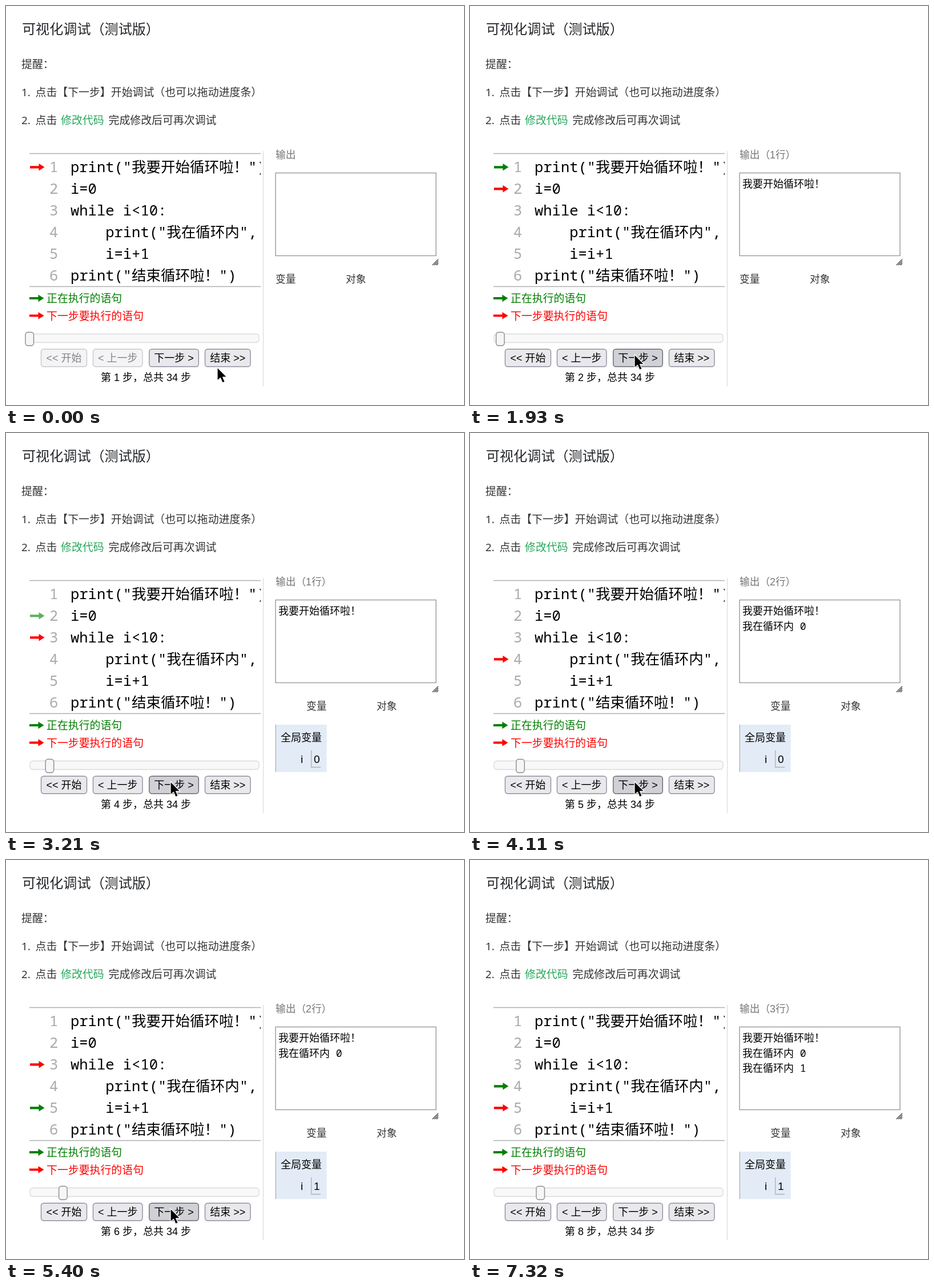
Recreate the animation shown at these times as an HTML page. Size 802 by 699 pixels, loop 8.39 s.

```html
<!DOCTYPE html>
<html lang="zh-CN">
<head>
<meta charset="utf-8">
<title>可视化调试</title>
<style>
html, body { margin: 0; width: 100%; height: 100%; overflow: hidden; background: #fff; }
svg { display: block; }
text { font-family: "Liberation Sans", "Noto Sans CJK SC", sans-serif; font-size: 18px; white-space: pre; }
.body text { font-family: "Noto Sans", "Noto Sans CJK SC", sans-serif; font-size: 18.9px; fill: #333; }
.body .title { font-size: 24.1px; font-weight: 500; fill: #24272b; }
.body .link { fill: #27a75c; }
.code text, .out { font-family: "Noto Sans Mono", "Noto Sans CJK SC", monospace; }
.code text { font-size: 25.5px; }
.code .num { fill: #aaa; }
.legend text { font-size: 18.9px; }
.label { font-size: 17.7px; fill: #333; }
.var { font-size: 19px; }
</style>
</head>
<body>
<svg id="stage" width="802" height="699" viewBox="0 0 802 699">
  <defs>
    <path id="arrow" d="M0 -2.1H15.5V-6.3L25.5 0L15.5 6.3V2.1H0Z"/>
    <clipPath id="pane"><rect x="41" y="259" width="405" height="232"/></clipPath>
  </defs>
  <g class="body">
    <text class="title" x="28" y="49">可视化调试（测试版）</text>
    <text x="27" y="109">提醒：</text>
    <text x="27" y="158">1.</text>
    <text x="51.5" y="158">点击【下一步】开始调试（也可以拖动进度条）</text>
    <text x="27" y="207">2.</text>
    <text x="51.5" y="207">点击</text>
    <text class="link" x="96" y="207">修改代码</text>
    <text x="179.5" y="207">完成修改后可再次调试</text>
  </g>
  <path d="M41 258.5H446M41 491.5H446" stroke="#b0b0b0" stroke-width="1.5"/>
  <path d="M450.5 254V666" stroke="#dcdcdc" stroke-width="1.3"/>
  <g id="code" class="code" clip-path="url(#pane)"></g>
  <use id="done" href="#arrow"/>
  <use id="next" href="#arrow" fill="#f00"/>
  <g class="legend" fill="#008000">
    <use href="#arrow" x="41" y="512"/>
    <text x="71" y="518.5">正在执行的语句</text>
  </g>
  <g class="legend" fill="#f00">
    <use href="#arrow" x="41" y="542.5"/>
    <text x="71" y="549.5">下一步要执行的语句</text>
  </g>
  <rect x="42" y="574.5" width="401" height="15" rx="5" fill="#f8f8f8" stroke="#dadada" stroke-width="1.3"/>
  <rect id="thumb" y="571.5" width="14.5" height="23.5" rx="4.5" fill="#f6f6f6" stroke="#8c8c8c" stroke-width="1.4"/>
  <g id="buttons"></g>
  <text id="count" x="245" y="657" text-anchor="middle"></text>

  <text id="lines" class="label" x="472" y="267" style="fill:#757575"></text>
  <rect x="472" y="292.5" width="281" height="145" fill="#fff" stroke="#999" stroke-width="1.4"/>
  <path d="M757 443V454H746Z" fill="#bbb"/>
  <path d="M746.5 454L757 443.5M750 454L757 447M753.5 454L757 450.5" stroke="#666" stroke-width="1.4"/>
  <text class="out" x="477" y="318">我要开始循环啦！</text>
  <text class="out" x="477" y="345">我在循环内 0</text>
  <text class="out" x="477" y="371">我在循环内 1</text>
  <g id="heads">
    <text class="label" x="472" y="485">变量</text>
    <text class="label" x="595" y="485">对象</text>
  </g>
  <g id="vars">
    <rect x="472" y="511" width="89.5" height="83" fill="#e2ebf6"/>
    <path d="M472.3 511V594M534.7 556V585.5H551" fill="none" stroke="#a6b3b6" stroke-width="1.3"/>
    <text x="481" y="539.5">全局变量</text>
    <text class="var" x="516" y="578">i</text>
    <text id="value" class="var" x="539" y="577.5"></text>
  </g>
  <path id="cursor" d="M0 0V23.5L5.3 18.6L9 27L13.3 25.2L9.6 17H16.8Z" fill="#000" stroke="#fff" stroke-width="1.2" stroke-linejoin="round"/>
</svg>
<script>
const LOOP = 8390, LEAVE = 7290;
const $ = id => document.getElementById(id);

const source = ['print("我要开始循环啦！")', 'i=0', 'while i<10:',
  '    print("我在循环内", i)', '    i=i+1', 'print("结束循环啦！")'];

// Mouse down and mouse up of each click on the "next" button
const clicks = [[1390, 1460], [2230, 2290], [3050, 3120], [3850, 3930],
  [4680, 4950], [5610, 5940], [6620, 6700]];

// Per step: executed line, upcoming line, output lines, value of i
const steps = [[0, 1, 0], [1, 2, 1], [2, 3, 1, 0], [3, 4, 1, 0],
  [4, 5, 2, 0], [5, 3, 2, 1], [3, 4, 2, 1], [4, 5, 3, 1]];

const add = (parent, tag, attrs, content = '') => {
  const el = document.createElementNS('http://www.w3.org/2000/svg', tag);
  for (const k in attrs) el.setAttribute(k, attrs[k]);
  el.textContent = content;
  return parent.appendChild(el);
};

source.forEach((line, i) => {
  const y = 291 + 38 * i;
  const indent = line.length - line.trimStart().length;
  add($('code'), 'text', { class: 'num', x: 76, y }, i + 1);
  add($('code'), 'text', { x: 113 + indent * 15.3, y }, line.trim());
});

const buttons = [['<< 开始', 61.5, 80], ['< 上一步', 152.5, 86.5],
  ['下一步 >', 250.8, 86.5], ['结束 >>', 348.5, 79.5]].map(([name, x, width]) => ({
  x, width,
  box: add($('buttons'), 'rect', { x, y: 601.2, width, height: 30.6, rx: 4.5, 'stroke-width': 1.4 }),
  label: add($('buttons'), 'text', { x: x + width / 2, y: 623, 'text-anchor': 'middle' }, name)
}));

const outputs = document.querySelectorAll('.out');
const clamp = v => Math.min(1, Math.max(0, v));
const ease = v => v < 0.5 ? 4 * v ** 3 : 1 - 4 * (1 - v) ** 3;
const mix = (a, b, v) => a + (b - a) * v;
const place = (el, x, y) => el.setAttribute('transform', `translate(${x} ${y})`);
const show = (el, on) => el.style.display = on ? '' : 'none';
const rowY = line => 282.3 + 38 * (line - 1);

function drawArrows(n, since) {
  const [line, next] = steps[n];
  const [oldLine, oldNext] = n ? steps[n - 1] : steps[0];
  const fading = oldLine > 0 && since < 200;
  const fade = fading ? ease(clamp(since / 200)) : 0;
  const shown = fading ? oldLine : line;
  show($('done'), shown > 0);
  place($('done'), 42, rowY(shown));
  $('done').setAttribute('fill', `rgb(${255 * fade},${mix(128, 255, fade)},${255 * fade})`);
  const slide = ease(clamp((since - 200) / 250));
  place($('next'), 42, mix(rowY(oldNext), rowY(next), slide));
}

function drawButtons(n, pressed, mx, my, present) {
  buttons.forEach(({ x, width, box, label }, i) => {
    const off = n === 0 && i < 2;
    const over = present && !off && mx > x && mx < x + width && my > 601 && my < 632;
    const [fill, line] = off ? ['#f4f4f6', '#c8c8ce']
      : over && pressed ? ['#b1b1b9', '#484851']
      : over ? ['#d0d0d7', '#67676f'] : ['#e9e9ed', '#8f8f9d'];
    box.setAttribute('fill', fill);
    box.setAttribute('stroke', line);
    label.setAttribute('fill', off ? '#858585' : '#000');
  });
}

function draw(t) {
  const n = clicks.filter(c => t >= c[1]).length;
  const since = n ? t - clicks[n - 1][1] : LOOP;
  const pressed = clicks.some(c => t >= c[0] && t < c[1]);
  const [, , count, value] = steps[n];
  const hasVars = value !== undefined;

  drawArrows(n, since);
  $('thumb').setAttribute('x', 34 + 11.72 * n);
  $('count').textContent = `第 ${n + 1} 步，总共 34 步`;
  $('lines').textContent = count ? `输出（${count}行）` : '输出';
  outputs.forEach((el, i) => show(el, i < count));
  place($('heads'), hasVars ? 54 : 0, 0);
  show($('vars'), hasVars);
  $('value').textContent = hasVars ? value : '';

  const move = ease(clamp((t - 90) / 540));
  const mx = mix(370, 288, move), my = mix(633, 610.5, move);
  const present = t < LEAVE;
  show($('cursor'), present);
  place($('cursor'), mx, my);
  drawButtons(n, pressed, mx, my, present);
}

const start = performance.now();
function tick() {
  draw((performance.now() - start) % LOOP);
  requestAnimationFrame(tick);
}
tick();
</script>
</body>
</html>
```
